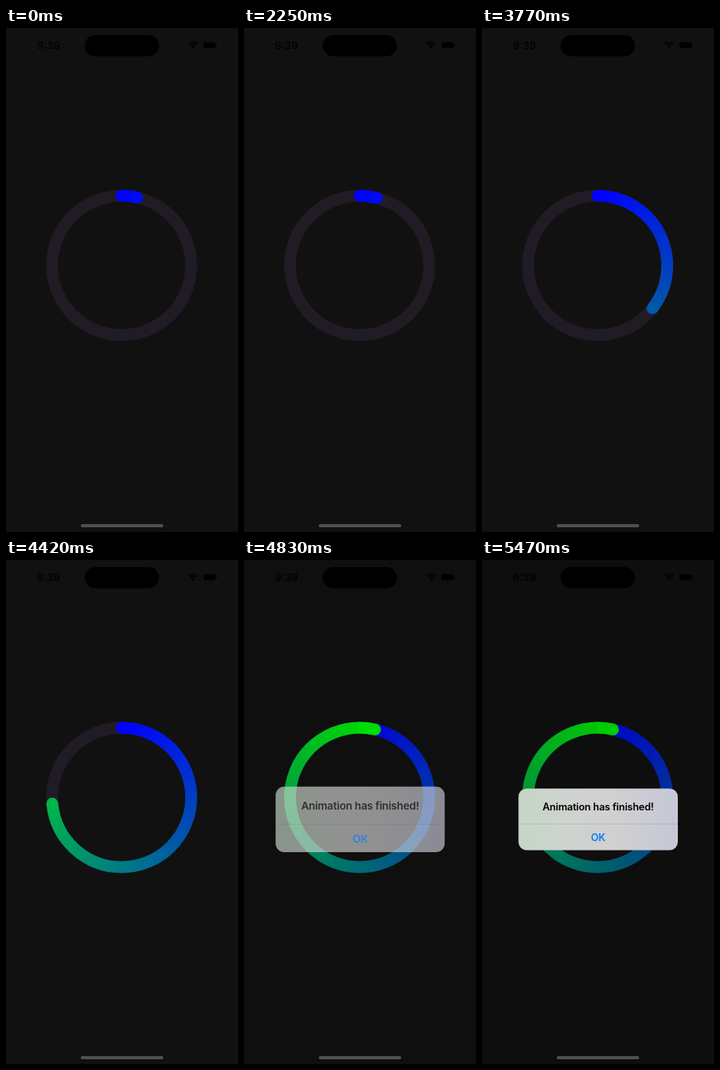
Write an HTML page with a canvas that moves like this. It is 295 by 640 pixels and loops after 6140 ms.

```html
<!DOCTYPE html>
<html lang="en">
<head>
<meta charset="utf-8">
<title>Progress ring</title>
<style>
html, body { margin: 0; width: 100%; height: 100%; overflow: hidden; background: #111; }
canvas { display: block; width: 295px; height: 640px; }
</style>
</head>
<body>
<canvas id="stage"></canvas>
<script>
const W = 295, H = 640, LOOP = 6140;
const CX = 147, CY = 301.5, R = 88.5, THICK = 15;
const FIRST = 12.8, LAST = 372.8, ALERT_AT = 4730;
const FONT = 'Inter, "Liberation Sans", sans-serif';

const canvas = document.getElementById('stage');
const ctx = canvas.getContext('2d');
const dpr = window.devicePixelRatio || 1;
canvas.width = W * dpr;
canvas.height = H * dpr;

// The picture advances in short steps: [first, last, count]
const RUNS = [[0, 0, 1], [2250, 2250, 1], [2450, 3050, 7], [3150, 3670, 6],
  [3770, 4300, 6], [4420, 4940, 6], [5040, 5470, 5]];
const ticks = RUNS.flatMap(([a, b, n]) =>
  Array.from({ length: n }, (_, i) => n > 1 ? Math.floor((a + (b - a) * i / (n - 1)) / 10) * 10 : a));
const hold = t => ticks.filter(k => k <= t).pop();

// Sweep in degrees over time
const KEYS = [[2150, FIRST], [2250, 14.3], [2950, 36], [3770, 128], [4420, 265], [4740, LAST]];

function slope(i) {
  const a = KEYS[Math.max(i - 1, 0)], b = KEYS[Math.min(i + 1, KEYS.length - 1)];
  return (b[1] - a[1]) / (b[0] - a[0]);
}

function sweepAt(t) {
  if (t <= KEYS[0][0]) return FIRST;
  const i = KEYS.findIndex(k => k[0] > t) - 1;
  if (i < 0) return LAST;
  const [t0, v0] = KEYS[i], [t1, v1] = KEYS[i + 1];
  const d = t1 - t0, u = (t - t0) / d, w = 1 - u;
  return v0 * (1 + 2 * u) * w * w + v1 * u * u * (3 - 2 * u)
    + d * (slope(i) * u * w * w - slope(i + 1) * u * u * w);
}

const rad = deg => (deg - 90) * Math.PI / 180;

function tint(deg) {
  const g = Math.round(255 * Math.min(1, Math.max(0, deg / LAST)));
  return `rgb(0,${g},${255 - g})`;
}

function arc(from, to, style) {
  ctx.beginPath();
  ctx.arc(CX, CY, R, rad(from), rad(to));
  ctx.lineWidth = THICK;
  ctx.strokeStyle = style;
  ctx.stroke();
}

function cap(deg) {
  ctx.beginPath();
  ctx.arc(CX + R * Math.cos(rad(deg)), CY + R * Math.sin(rad(deg)), THICK / 2, 0, Math.PI * 2);
  ctx.fillStyle = tint(deg);
  ctx.fill();
}

function box(x, y, w, h, r, style) {
  ctx.beginPath();
  ctx.roundRect(x, y, w, h, r);
  ctx.fillStyle = style;
  ctx.fill();
}

function label(text, x, y, size, weight, color, spacing = 0) {
  ctx.font = `${weight} ${size}px ${FONT}`;
  ctx.letterSpacing = spacing + 'px';
  ctx.textAlign = 'center';
  ctx.textBaseline = 'alphabetic';
  ctx.fillStyle = color;
  ctx.fillText(text, x, y);
}

function ring(sweep) {
  arc(0, 360, '#211b26');
  const fade = ctx.createConicGradient(rad(0), CX, CY);
  fade.addColorStop(0, tint(0));
  fade.addColorStop(1, tint(360));
  cap(0);
  arc(0, Math.min(sweep, 360), fade);
  if (sweep > 360) arc(359.5, sweep, tint(LAST));
  cap(sweep);
}

function statusBar() {
  label('9:39', 54, 27, 13.5, 500, '#000');
  box(100, 9, 94.5, 27, 13.5, '#000');
  ctx.strokeStyle = '#000';
  ctx.lineWidth = 1.6;
  for (const r of [8.3, 5.4]) {
    ctx.beginPath();
    ctx.arc(238, 26, r, -Math.PI * 0.75, -Math.PI * 0.25);
    ctx.stroke();
  }
  ctx.beginPath();
  ctx.moveTo(238, 26.3);
  ctx.arc(238, 26.3, 3, -Math.PI * 0.75, -Math.PI * 0.25);
  ctx.fillStyle = '#000';
  ctx.fill();
  box(251, 18, 15.5, 7.5, 2.2, '#000');
  box(267, 20.3, 1, 3, 0.5, '#000');
}

function alertBox(age) {
  const alpha = 1 - Math.exp(-age / 90);
  const scale = 1 + 0.155 * Math.exp(-age / 108);
  ctx.fillStyle = `rgba(0,0,0,${0.2 * alpha})`;
  ctx.fillRect(0, 0, W, H);

  ctx.save();
  ctx.globalAlpha = alpha;
  ctx.translate(147.7, 329.4);
  ctx.scale(scale, scale);
  const glass = ctx.createLinearGradient(-101, 0, 101, 0);
  glass.addColorStop(0, '#c5d6c7');
  glass.addColorStop(0.3, '#cfd3cf');
  glass.addColorStop(0.6, '#d0d0d0');
  glass.addColorStop(1, '#c6c7d7');
  box(-101.3, -39.2, 202.6, 78.4, 10.5, glass);
  ctx.fillStyle = 'rgba(60,60,67,0.22)';
  ctx.fillRect(-101.3, 5.4, 202.6, 0.7);
  label('Animation has finished!', 0, -11.8, 12.75, 600, '#000', -0.16);
  label('OK', 0, 27.6, 12.75, 600, '#0a7aff', -0.16);
  ctx.restore();
}

function draw(t) {
  ctx.setTransform(dpr, 0, 0, dpr, 0, 0);
  ctx.fillStyle = '#111';
  ctx.fillRect(0, 0, W, H);
  ring(sweepAt(t));
  label('Animate', 148, 431, 12, 400, '#12121f');
  statusBar();
  if (t > ALERT_AT) alertBox(t - ALERT_AT);
  box(95, 630, 105, 4, 2, '#505050');
}

const start = performance.now();
function frame() {
  draw(hold((performance.now() - start) % LOOP));
  requestAnimationFrame(frame);
}
frame();
</script>
</body>
</html>
```
